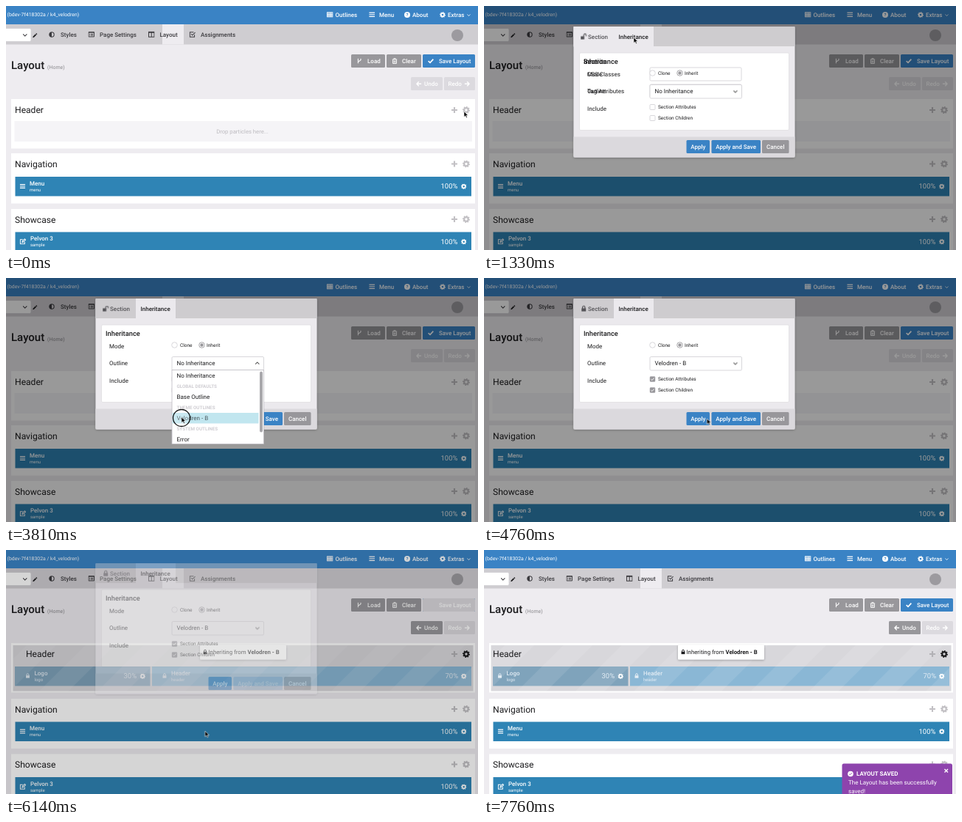
An HTML page that plays this animation: 640x333 px, repeating every 7810 ms.

```html
<!DOCTYPE html>
<html lang="en">
<head>
<meta charset="utf-8">
<title>Layout editor</title>
<style>
html, body { margin: 0; width: 100%; height: 100%; overflow: hidden; background: #eeecf0; }
svg.stage { display: block; width: 640px; height: 333px; }
text { font: 8px Roboto, sans-serif; fill: currentColor; text-rendering: geometricPrecision; white-space: pre; }
.tiny { font-size: 6px; }
.small { font-size: 6.5px; }
.pct { font-size: 9.5px; }
.title { font-size: 12.1px; }
.med { font-weight: 500; }
.bold { font-weight: 700; }
.mid { text-anchor: middle; }
.line { fill: none; stroke: currentColor; }
.white { color: #fff; }
.ink { color: #1c1c1e; }
.dim { color: #c2c0c4; }
.blue { fill: #3a83c5; }
.grey { fill: #98979b; }
.pale { fill: #dcdadf; }
.block { fill: #2f84b5; }
.field { fill: #fff; stroke: #cfcdd2; stroke-width: .8; }

/* one loop is 7810 ms */
.cut { animation: 7.81s step-end infinite; }
.ease { animation: 7.81s linear infinite; }
.spin { animation: spin .781s linear infinite; transform-box: fill-box; transform-origin: center; }
@keyframes spin { to { transform: rotate(360deg); } }

#before { animation-name: before; }
#after, #undo { animation-name: after; }
#below { animation-name: below; }
#hover { animation-name: hover; }
#tip { animation-name: tip; }
#saving { animation-name: saving; }
#toast { animation-name: toast; }
#shade { animation-name: shade; }
#ball { animation-name: ball; }
#dialog { animation-name: dialog; }
#loading { animation-name: loading; }
#panel { animation-name: panel; }
#section { animation-name: section; }
#inherit { animation-name: inherit; }
#empty, #unlocked { animation-name: empty; }
#chosen, #ticks, #locked { animation-name: chosen; }
#menu { animation-name: menu; }
#mark { animation-name: mark; }
#apply { animation-name: apply; }
#idle { animation-name: idle; }
#busy { animation-name: busy; }
#cursor { animation-name: cursor; }
#ring { animation-name: ring; }
#arrow { animation-name: arrow; }
#hand { animation-name: hand; }
#slide { animation-name: slide; }
.nudge { animation-name: nudge; }

@keyframes before { 0% { opacity: 1; } 76.82%, 100% { opacity: 0; } }
@keyframes after { 0% { opacity: 0; } 76.82%, 100% { opacity: 1; } }
@keyframes below { 0% { transform: none; } 76.82%, 100% { transform: translateY(1.5px); } }
@keyframes hover { 0% { opacity: 0; } .77% { opacity: 1; } 12.8%, 100% { opacity: 0; } }
@keyframes tip { 0%, .7% { opacity: 0; } 2.5%, 6.4% { opacity: 1; } 10.88%, 100% { opacity: 0; } }
@keyframes saving { 0% { opacity: 0; } 76.82% { opacity: 1; } 89.63%, 100% { opacity: 0; } }
@keyframes toast { 0%, 89.63% { opacity: 0; } 92.83%, 100% { opacity: 1; } }
@keyframes shade { 0%, 4.8% { opacity: 0; } 10.88%, 76.82% { opacity: .4; } 79.9%, 100% { opacity: 0; } }
@keyframes ball { 0%, 4.8% { opacity: 0; } 7.04%, 11% { opacity: 1; } 12.16%, 100% { opacity: 0; } }
@keyframes dialog {
  0%, 4.8% { opacity: 0; transform: translateY(-17px); }
  10.88%, 76.82% { opacity: 1; transform: none; }
  79.9%, 100% { opacity: 0; transform: translateY(-17px); }
}
@keyframes loading { 0% { opacity: 1; } 12.16%, 100% { opacity: 0; } }
@keyframes panel { 0% { opacity: 0; } 12.16%, 100% { opacity: 1; } }
@keyframes section { 0% { opacity: 1; } 19.21%, 100% { opacity: 0; } }
@keyframes inherit { 0% { opacity: 0; } 19.21%, 100% { opacity: 1; } }
@keyframes empty { 0% { opacity: 1; } 49.94%, 100% { opacity: 0; } }
@keyframes chosen { 0% { opacity: 0; } 49.94%, 100% { opacity: 1; } }
@keyframes menu { 0% { opacity: 0; } 34.57% { opacity: 1; } 49.94%, 100% { opacity: 0; } }
@keyframes mark { 0% { transform: translateY(-58px); } 40.97% { transform: translateY(-29px); } 43.28%, 100% { transform: none; } }
@keyframes apply { 0% { transform: none; } 68.5% { transform: translateX(-15px); } 76.82%, 100% { transform: none; } }
@keyframes idle { 0% { opacity: 1; } 68.5% { opacity: 0; } 76.82%, 100% { opacity: .35; } }
@keyframes busy { 0% { opacity: 0; } 68.5% { opacity: 1; } 76.82%, 100% { opacity: 0; } }
@keyframes slide { 0%, 78.62% { transform: translateX(15px); } 83.23%, 100% { transform: none; } }
@keyframes nudge { 0%, 78.62% { transform: translateX(8px); } 83.23%, 100% { transform: none; } }
@keyframes cursor {
  0% { transform: translate(621px, 144px); }
  5.38% { transform: translate(621px, 144px); animation-timing-function: ease-in; }
  8.58% { transform: translate(411px, 152px); animation-timing-function: ease-out; }
  13.44% { transform: translate(203px, 43px); }
  21.77% { transform: translate(203px, 43px); animation-timing-function: ease-in-out; }
  30.73%, 38.41% { transform: translate(238px, 114px); animation-timing-function: ease-in-out; }
  44.81%, 56.08% { transform: translate(238px, 190px); animation-timing-function: ease-in-out; }
  64.02%, 76.18% { transform: translate(331px, 193px); }
  78.62% { transform: translate(270px, 247px); }
  83.23%, 100% { transform: translate(165px, 345px); }
}
@keyframes ring {
  0% { opacity: 0; } 3.2% { opacity: 1; } 5.38% { opacity: 0; }
  17.93% { opacity: 1; } 20.49% { opacity: 0; }
  33.29% { opacity: 1; } 35.85% { opacity: 0; }
  47.38% { opacity: 1; } 49.94% { opacity: 0; }
  66.58% { opacity: 1; } 69.14%, 100% { opacity: 0; }
}
@keyframes arrow { 0% { opacity: 1; } 29.45% { opacity: 0; } 35.21%, 100% { opacity: 1; } }
@keyframes hand { 0% { opacity: 0; } 29.45% { opacity: 1; } 35.21%, 100% { opacity: 0; } }
</style>
</head>
<body>
<svg class="stage" width="640" height="333" viewBox="0 0 640 333">
<defs>
  <symbol id="gear" viewBox="0 0 10 10">
    <circle class="line" cx="5" cy="5" r="2.8" stroke-width="2.2"/>
    <circle class="line" cx="5" cy="5" r="4.2" stroke-width="1.6" pathLength="16" stroke-dasharray="1"/>
  </symbol>
  <symbol id="plus" viewBox="0 0 10 10"><path class="line" stroke-width="2.4" d="M5 .5v9M.5 5h9"/></symbol>
  <symbol id="bars" viewBox="0 0 10 10"><path class="line" stroke-width="1.4" d="M.5 2h9M.5 5h9M.5 8h9"/></symbol>
  <symbol id="grid" viewBox="0 0 10 10"><path class="line" stroke-width="1.2" d="M.6 1.6h8.8v7H.6zM.6 4h8.8M.6 6.3h8.8M3.5 2v6.500M6.500 2v6.500"/></symbol>
  <symbol id="list" viewBox="0 0 10 10"><path class="line" stroke-width="1.1" d="M.6 1.200h8.8v7.600H.6zM.6 2h8.800M2 4.600h1M4 4.600h4M2 6.600h1M4 6.600h4"/></symbol>
  <symbol id="columns" viewBox="0 0 10 10"><path class="line" stroke-width="1.2" d="M.6 1h8.800v8H.6zM.6 2h8.800M5 1v8"/></symbol>
  <symbol id="half" viewBox="0 0 10 10"><circle class="line" cx="5" cy="5" r="4" stroke-width="1.3"/><path fill="currentColor" d="M5 1a4 4 0 0 0 0 8z"/></symbol>
  <symbol id="check" viewBox="0 0 10 10"><path class="line" stroke-width="2" d="M.8 5.200 3.800 8 9.200 2"/></symbol>
  <symbol id="checkbox" viewBox="0 0 10 10"><path class="line" stroke-width="1.200" d="M8.300 5.500V9H1V1.500h6M3 4.300l2 2 4.500-4.500"/></symbol>
  <symbol id="edit" viewBox="0 0 10 10"><path class="line" stroke-width="1.200" d="M8 6v3H1V2h4M4 6.500l.5-2L8 1l1.500 1.500L6 6z"/></symbol>
  <symbol id="pencil" viewBox="0 0 10 10"><path fill="currentColor" d="M.5 9.500 1 7l5-5 2 2-5 5zM6.700 1.300 8 0l2 2-1.300 1.300z"/></symbol>
  <symbol id="lock" viewBox="0 0 10 10"><path fill="currentColor" d="M1.500 4.500h7v5h-7z"/><path class="line" stroke-width="1.400" d="M3 5V3a2 2 0 0 1 4 0v2"/></symbol>
  <symbol id="unlock" viewBox="0 0 10 10"><path fill="currentColor" d="M.5 4.500h6v5h-6z"/><path class="line" stroke-width="1.300" d="M5.500 5V3a2 2 0 0 1 4 0v1.500"/></symbol>
  <symbol id="fork" viewBox="0 0 10 10"><path class="line" stroke-width="1.300" d="M3 1v8M7.500 1v2.500L3 6.500"/></symbol>
  <symbol id="trash" viewBox="0 0 10 10"><path class="line" stroke-width="1.200" d="M1 2.500h8M3.500 2V.8h3V2M2 3v6.300h6V3M4 4.500V8M6 4.500V8"/></symbol>
  <symbol id="left" viewBox="0 0 10 10"><path class="line" stroke-width="1.900" d="M9.500 5H1.500M5 1 1.200 5 5 9"/></symbol>
  <symbol id="right" viewBox="0 0 10 10"><path class="line" stroke-width="1.900" d="M.5 5h8M5 1l3.800 4L5 9"/></symbol>
  <symbol id="down" viewBox="0 0 10 10"><path class="line" stroke-width="1.700" d="M1 3l4 4 4-4"/></symbol>
  <symbol id="cross" viewBox="0 0 10 10"><path class="line" stroke-width="2" d="M1.500 1.500l7 7M8.500 1.500l-7 7"/></symbol>
  <symbol id="dots" viewBox="0 0 10 10"><circle class="line" cx="5" cy="5" r="3.800" stroke-width="1.800" pathLength="16" stroke-dasharray="1"/></symbol>
  <pattern id="stripes" width="56" height="56" patternUnits="userSpaceOnUse" patternTransform="rotate(45)">
    <rect width="28" height="56" fill="#fff" opacity=".1"/>
  </pattern>
  <filter id="shadow" x="-20%" y="-20%" width="140%" height="150%"><feDropShadow dx="0" dy="1" stdDeviation="1.5" flood-opacity=".3"/></filter>
</defs>

<!-- top bar -->
<rect width="640" height="333" fill="#eeecf0"/>
<rect class="blue" width="640" height="25"/>
<g class="white">
  <text x="-4" y="14.300" style="font-size:6.900px">1 (bdev-7f418302a / k4_velodren)</text>
  <use href="#grid" x="435" y="7.500" width="8.500" height="8.500"/><text class="med" x="446.500" y="14.800">Outlines</text>
  <use href="#bars" x="492" y="7.500" width="8.500" height="8.500"/><text class="med" x="506" y="14.800">Menu</text>
  <circle cx="544" cy="12" r="4" fill="#fff"/><text class="bold mid tiny" x="544" y="14.200" fill="#3a83c5" style="fill:#3a83c5">?</text>
  <text class="med" x="551" y="14.800">About</text>
  <use href="#gear" x="588" y="8" width="8" height="8"/><text class="med" x="599" y="14.800">Extras</text>
  <use href="#down" x="625" y="10" width="5" height="5"/>
</g>

<!-- tabs -->
<rect y="25" width="640" height="27.500" fill="#cfcdd1"/>
<rect x="212" y="25" width="29" height="27.500" fill="#eeecf0"/>
<rect class="field" x="-3" y="30.500" width="37" height="18" rx="2"/>
<g color="#3c3b3f">
  <use href="#down" x="22.500" y="36.500" width="6.500" height="6.500"/>
  <use href="#pencil" class="ink" x="36" y="37" width="6.500" height="6.500"/>
  <use href="#half" x="58" y="35" width="8" height="8"/><text class="med" x="74" y="41.800">Styles</text>
  <use href="#list" x="111.500" y="34.500" width="8.500" height="8.500"/><text class="med" x="127" y="41.800">Page Settings</text>
  <use href="#columns" x="193" y="34.500" width="8.500" height="8.500"/><text class="med" x="208.500" y="41.800">Layout</text>
  <use href="#checkbox" x="248.500" y="34.500" width="8.500" height="8.500"/><text class="med" x="264" y="41.800">Assignments</text>
</g>
<circle cx="612" cy="40" r="8" fill="#9c9a9f"/>

<!-- toolbar -->
<text class="med ink" x="7" y="85.500" style="font-size:15px">Layout</text>
<text x="56" y="85.800" color="#8a898d" style="font-size:7px">(Home)</text>
<g class="white">
  <rect class="grey" x="468" y="66" width="46" height="18" rx="1.500"/>
  <use href="#fork" x="475" y="71" width="8" height="8"/><text class="med" x="490" y="77.800">Load</text>
  <rect class="grey" x="516" y="66" width="47" height="18" rx="1.500"/>
  <use href="#trash" x="523" y="71" width="8" height="8"/><text class="med" x="537" y="77.800">Clear</text>
  <rect class="blue" x="565" y="66" width="71" height="18" rx="1.500"/>
  <use href="#check" x="572" y="71" width="8" height="8"/><text class="med" x="587" y="77.800">Save Layout</text>
  <g id="saving" class="cut">
    <rect class="pale" x="565" y="66" width="71" height="18" rx="1.500"/>
    <use class="spin" href="#dots" x="572" y="71" width="8" height="8"/><text class="med" x="587" y="77.800">Save Layout</text>
  </g>
  <rect class="pale" x="549" y="97" width="43" height="18" rx="1.500"/>
  <rect id="undo" class="grey cut" x="549" y="97" width="43" height="18" rx="1.500"/>
  <use href="#left" x="556" y="102.500" width="7.500" height="7.500"/><text class="med" x="567" y="108.800">Undo</text>
  <rect class="pale" x="594" y="97" width="42" height="18" rx="1.500"/>
  <text class="med" x="599.500" y="108.800">Redo</text><use href="#right" x="621.500" y="102.500" width="7.500" height="7.500"/>
</g>

<!-- header section -->
<rect x="7" y="127" width="629" height="67.500" fill="#fff"/>
<g id="before" class="cut">
  <rect x="11.500" y="157" width="620.500" height="28" fill="#f5f4f7"/>
  <text class="mid" x="320.500" y="173.500" color="#bdbbc0" style="font-size:7.700px">Drop particles here...</text>
  <text class="title ink" x="12" y="146.300">Header</text>
  <g class="dim">
    <use href="#plus" x="603.500" y="137.500" width="9" height="9"/>
    <use href="#gear" x="619" y="137" width="10" height="10"/>
  </g>
  <use id="hover" class="cut" color="#4a494d" href="#gear" x="619" y="137" width="10" height="10"/>
</g>
<g id="after" class="cut">
  <rect x="9.500" y="130" width="624" height="62.500" fill="#d8d7db"/>
  <rect x="12" y="159" width="183.500" height="26.500" fill="#7fa3bb"/>
  <rect x="198" y="159" width="433" height="26.500" fill="#8ab7d5"/>
  <rect x="9.500" y="130" width="624" height="62.500" fill="url(#stripes)"/>
  <text id="slide" class="title ink ease" x="12" y="146.300">Header</text>
  <use color="#b2b1b5" href="#plus" x="603.500" y="137.500" width="9" height="9"/>
  <use class="ink" href="#gear" x="619" y="137" width="10" height="10"/>
  <g color="#e2ecf4">
    <g class="nudge ease">
      <use href="#lock" x="18" y="168" width="7" height="7"/>
      <text class="med" x="30.500" y="170.800">Logo</text><text class="tiny" x="30.500" y="178.500">logo</text>
      <use href="#lock" x="203.500" y="168" width="7" height="7"/>
      <text class="med" x="216" y="170.800">Header</text><text class="tiny" x="216" y="178.500">header</text>
    </g>
    <text class="pct" x="159.500" y="174.500">30%</text><use class="white" href="#gear" x="181.500" y="168.500" width="7.500" height="7.500"/>
    <text class="pct" x="595.500" y="174.500">70%</text><use class="white" href="#gear" x="617" y="168.500" width="7.500" height="7.500"/>
  </g>
  <rect x="263" y="129.500" width="117" height="20" rx="1.500" fill="#fff" filter="url(#shadow)"/>
  <g class="ink">
    <use href="#lock" x="266.500" y="135.500" width="7" height="7"/>
    <text x="274.500" y="142.300" style="font-size:7.800px">Inheriting from <tspan class="bold">Velodren - B</tspan></text>
  </g>
</g>

<!-- lower sections -->
<g id="below" class="cut">
  <rect x="7" y="201" width="629" height="68.500" fill="#fff"/>
  <rect x="7" y="277" width="629" height="60" fill="#fff"/>
  <rect class="block" x="12.500" y="233" width="618.500" height="26.500"/>
  <rect class="block" x="12.500" y="308.500" width="618.500" height="26.500"/>
  <g class="ink">
    <text class="title" x="12" y="220.300">Navigation</text>
    <text class="title" x="12" y="295.800">Showcase</text>
  </g>
  <g class="dim">
    <use href="#plus" x="603.500" y="211" width="9" height="9"/><use href="#gear" x="619" y="210.500" width="10" height="10"/>
    <use href="#plus" x="603.500" y="286.500" width="9" height="9"/><use href="#gear" x="619" y="286" width="10" height="10"/>
  </g>
  <g class="white">
    <use href="#bars" x="18.500" y="242" width="8" height="8"/>
    <text class="med" x="32" y="244.800">Menu</text><text class="tiny" x="32" y="252.500">menu</text>
    <text class="pct" x="589.500" y="249">100%</text><use href="#gear" x="617" y="242.500" width="7.500" height="7.500"/>
    <use href="#edit" x="18.500" y="317" width="8.500" height="8.500"/>
    <text class="med" x="33" y="320.300">Pelvon 3</text><text class="tiny" x="33" y="328">sample</text>
    <text class="pct" x="589.500" y="324.500">100%</text><use href="#gear" x="617" y="318" width="7.500" height="7.500"/>
  </g>
</g>

<g id="tip" class="ease">
  <path d="M573 111h59v19h-5l-3 4-3-4h-48z" opacity=".35"/>
  <text class="small mid" x="602.500" y="122.800" color="#e4e3e6">Section settings</text>
</g>

<g id="toast" class="white ease">
  <rect x="485.500" y="291.500" width="149.500" height="50" rx="2.500" fill="#8e44ad"/>
  <circle cx="497" cy="305.500" r="3.800" fill="#fff"/>
  <use color="#8e44ad" href="#check" x="494.700" y="303.300" width="4.500" height="4.500"/>
  <use href="#cross" x="623.500" y="298" width="6.500" height="6.500"/>
  <text class="bold" x="505" y="308.300">LAYOUT SAVED</text>
  <text x="494" y="320.300">The Layout has been successfully</text>
  <text x="494" y="331.500">saved!</text>
</g>

<rect id="shade" class="ease" width="640" height="333"/>
<g id="ball" class="ease">
  <circle cx="271" cy="-1" r="12" fill="#fff" filter="url(#shadow)"/>
  <g class="spin"><circle cx="271" cy="-1" r="7.500" fill="none" stroke="#eee" stroke-width="1"/><path d="M278.500-1a7.500 7.500 0 0 1-7.500 7.500" fill="none" stroke="#777" stroke-width="1.200"/></g>
</g>

<!-- dialog -->
<g id="dialog" class="ease ink">
  <g id="loading" class="cut">
    <rect x="121.500" y="28" width="300" height="28" rx="2" fill="#e9e7ec" filter="url(#shadow)"/>
    <text x="129" y="45">Loading</text>
    <use color="#8d8c90" href="#cross" x="409" y="34.500" width="5.500" height="5.500"/>
  </g>
  <g id="panel" class="cut">
    <rect x="121.500" y="28" width="300" height="178.500" rx="2" fill="#ebe9ed" filter="url(#shadow)"/>
    <rect x="121.500" y="28" width="300" height="27" fill="#cecccf"/>
    <rect x="121.500" y="178.500" width="300" height="28" fill="#dbd9dd"/>
    <rect x="129.500" y="64" width="284" height="105.500" rx="1.500" fill="#fff" stroke="#dddbdf" stroke-width=".7"/>

    <g id="section" class="cut">
      <rect x="121.500" y="28" width="54.500" height="27.500" fill="#ebe9ed"/>
      <text class="med" x="135" y="79.300" style="font-size:9.300px">Section</text>
      <text x="140" y="96.300">CSS Classes</text><rect class="field" x="225" y="84" width="124" height="18" rx="1.500"/>
      <text x="140" y="119.300">Tag Attributes</text><rect class="field" x="225" y="107" width="124" height="18" rx="1.500"/>
    </g>

    <g id="inherit" class="cut">
      <rect x="176" y="28" width="54" height="27.500" fill="#ebe9ed"/>
      <text class="med" x="135" y="79.300" style="font-size:9.300px">Inheritance</text>
      <text x="140" y="96.300">Mode</text><text x="140" y="119.300">Outline</text><text x="140" y="143.300">Include</text>
      <circle class="field" cx="228.500" cy="91.500" r="3.800"/><text class="small" x="236" y="93.800">Clone</text>
      <circle class="field" cx="265.500" cy="91.500" r="3.800" style="stroke:#8d8c90"/><circle class="grey" cx="265.500" cy="91.500" r="2.200"/>
      <text class="small" x="272" y="93.800">Inherit</text>
      <rect class="field" x="225" y="134.500" width="7" height="7" rx="1"/><text class="small" x="236" y="140.300">Section Attributes</text>
      <rect class="field" x="225" y="149.500" width="7" height="7" rx="1"/><text class="small" x="236" y="155.300">Section Children</text>
      <g id="ticks" class="cut white">
        <rect class="grey" x="225" y="134.500" width="7" height="7" rx="1"/><use href="#check" x="226" y="135.500" width="5" height="5"/>
        <rect class="grey" x="225" y="149.500" width="7" height="7" rx="1"/><use href="#check" x="226" y="150.500" width="5" height="5"/>
      </g>
      <rect class="field" x="225" y="107.500" width="124.500" height="18.500" rx="1.500"/>
      <text id="empty" class="cut" x="231.500" y="119.300">No Inheritance</text>
      <text id="chosen" class="cut" x="231.500" y="119.300">Velodren - B</text>
      <use color="#555" href="#down" x="337.500" y="113.500" width="6.500" height="6.500"/>
    </g>

    <g color="#555458">
      <use id="unlocked" class="cut" href="#unlock" x="130.500" y="37.500" width="8.500" height="8.500"/>
      <use id="locked" class="cut" href="#lock" x="131" y="37.500" width="8.500" height="8.500"/>
      <text class="med" x="141" y="44.800">Section</text>
    </g>
    <text class="med" x="182.500" y="44.800">Inheritance</text>

    <g class="white">
      <g id="apply" class="cut"><rect class="blue" x="274.500" y="183" width="31.500" height="18" rx="1.500"/><text class="med mid" x="290.300" y="194.800">Apply</text></g>
      <g id="idle" class="cut"><rect class="blue" x="308.500" y="183" width="66.500" height="18" rx="1.500"/><text class="med mid" x="341.700" y="194.800">Apply and Save</text></g>
      <g id="busy" class="cut">
        <rect x="294" y="183" width="81" height="18" rx="1.500" fill="#2e6ea9" stroke="#275f93" stroke-width=".8"/>
        <use class="spin" href="#dots" x="301" y="188" width="8" height="8"/>
        <text class="med mid" x="341.700" y="194.800">Apply and Save</text>
      </g>
      <rect class="grey" x="377" y="183" width="36.500" height="18" rx="1.500"/><text class="med mid" x="395.200" y="194.800">Cancel</text>
    </g>

    <g id="menu" class="cut">
      <rect x="334" y="110" width="12" height="13" fill="#fff"/>
      <use color="#555" href="#down" x="337.500" y="-119.500" width="6.500" height="6.500" transform="scale(1 -1)"/>
      <rect class="field" x="225" y="125.500" width="124.500" height="101" style="stroke:#bcbac0"/>
      <rect id="mark" class="cut" x="225.500" y="184" width="117" height="14.500" fill="#c1e6ef"/>
      <rect x="344" y="127.500" width="4" height="83" rx="2" fill="#a9a8ac"/>
      <text x="231.500" y="136">No Inheritance</text>
      <text x="231.500" y="165">Base Outline</text>
      <text x="231.500" y="194" color="#4c5a60">Velodren - B</text>
      <text x="231.500" y="223">Error</text>
      <g color="#cfcdd2" style="font-weight:700">
        <text class="bold" x="231.500" y="150.300" style="font-size:6.300px">GLOBAL DEFAULTS</text>
        <text class="bold" x="231.500" y="179.300" style="font-size:6.300px">THEME OUTLINES</text>
        <text class="bold" x="231.500" y="208.300" style="font-size:6.300px">SYSTEM OUTLINES</text>
      </g>
    </g>
  </g>
</g>

<!-- pointer -->
<g id="cursor" class="ease">
  <circle id="ring" class="cut" cy="1" r="11.500" fill="#fff" fill-opacity=".15" stroke="#111" stroke-width="1.300"/>
  <path id="arrow" class="cut" d="M0 0v7.500l1.800-1.700 1.300 2.700 1.300-.6-1.300-2.600h2.500z" stroke="#fff" stroke-width=".6"/>
  <path id="hand" class="cut" d="M-.5.500q.8-1 1.500 0v2.500l3.500.8q.8.300.7 1.200L4.500 8H.5L-2 5q0-1 1-.7l.5.500z" fill="#fff" stroke="#111" stroke-width=".8"/>
</g>
</svg>
</body>
</html>
```
